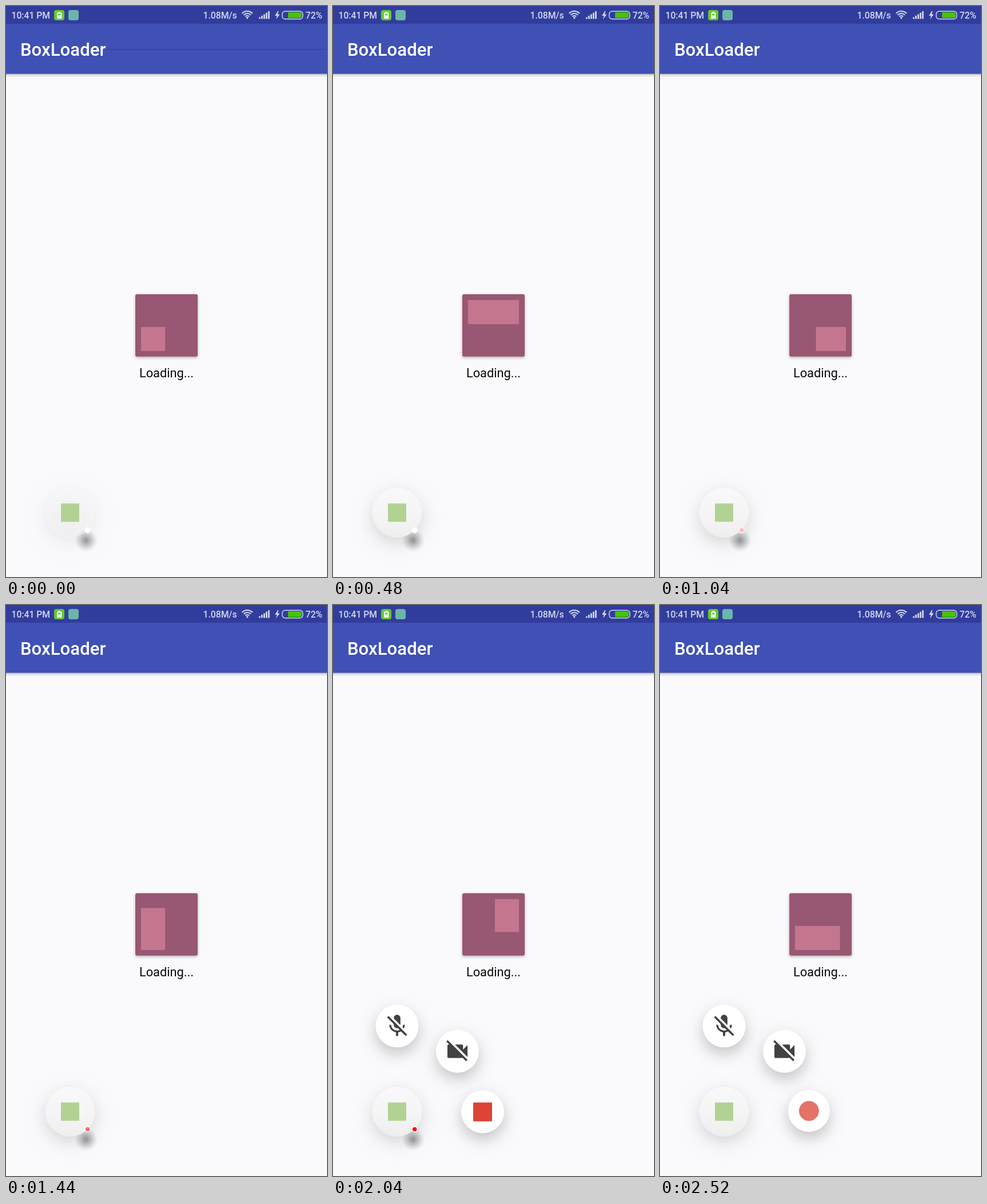
Write an HTML page with a canvas that moves like this. It is 561 px wide and 998 px high and loops after 2560 ms.

```html
<!DOCTYPE html>
<html lang="en">
<head>
<meta charset="utf-8">
<title>BoxLoader</title>
<style>
  html, body { margin: 0; width: 100%; height: 100%; overflow: hidden; background: #faf9fc; }
  canvas { display: block; }
</style>
</head>
<body>
<canvas id="stage" width="561" height="998"></canvas>
<script>
const ctx = document.getElementById('stage').getContext('2d');
const LOOP = 2560;
const BG = '#faf9fc';
const STATUS = '#d5d8ee';
const ICON = '#424242';

const MIC_OFF = new Path2D('M19 11h-1.7c0 .74-.16 1.43-.43 2.05l1.23 1.23c.56-.98.9-2.09.9-3.28z' +
  'm-4.02.17c0-.06.02-.11.02-.17V5c0-1.66-1.34-3-3-3S9 3.34 9 5v.18l5.98 5.99z' +
  'M4.27 3L3 4.27l6.01 6.01V11c0 1.66 1.33 3 2.99 3 .22 0 .44-.03.65-.08l1.66 1.66' +
  'c-.71.33-1.5.52-2.31.52-2.76 0-5.3-2.1-5.3-5.1H5c0 3.41 2.72 6.23 6 6.72V21h2v-3.28' +
  'c.91-.13 1.77-.45 2.54-.9L19.73 21 21 19.73z');
const CAM_OFF = new Path2D('M21 6.5l-4 4V7c0-.55-.45-1-1-1H9.82L21 17.18z' +
  'M3.27 2L2 3.27 4.73 6H4c-.55 0-1 .45-1 1v10c0 .55.45 1 1 1h12c.21 0 .39-.08.54-.18L19.73 21 21 19.73z');
const BOLT = new Path2D('M475 9L470 17H473.5L472 23L478.5 14.5H474.5L476.5 9z');

const clamp = v => Math.max(0, Math.min(1, v));
const ramp = (t, from, to) => clamp((t - from) / (to - from));
const easeOut = v => 1 - (1 - v) ** 3;
const mix = (a, b, v) => a + (b - a) * v;

function rect(x, y, w, h, color) {
  ctx.fillStyle = color;
  ctx.fillRect(x, y, w, h);
}

function roundRect(x, y, w, h, r, color) {
  ctx.beginPath();
  ctx.roundRect(x, y, w, h, r);
  ctx.fillStyle = color;
  ctx.fill();
}

function disc(x, y, r, color) {
  ctx.beginPath();
  ctx.arc(x, y, r, 0, Math.PI * 2);
  ctx.fillStyle = color;
  ctx.fill();
}

function label(text, x, y, font, color, align = 'left') {
  ctx.font = font + ' Roboto, sans-serif';
  ctx.textAlign = align;
  ctx.fillStyle = color;
  ctx.fillText(text, x, y);
}

function withShadow(color, blur, dy, draw) {
  ctx.save();
  ctx.shadowColor = color;
  ctx.shadowBlur = blur;
  ctx.shadowOffsetY = dy;
  draw();
  ctx.restore();
}

function withAlpha(alpha, draw) {
  ctx.save();
  ctx.globalAlpha *= alpha;
  draw();
  ctx.restore();
}

function drawStatusBar() {
  rect(0, 0, 561, 31, '#313d9d');
  const font = '500 15.7px';
  label('10:41 PM', 9.5, 21.5, font, STATUS);
  label('1.08M/s', 344.5, 21.5, font, STATUS);
  label('72%', 523.5, 21.5, font, STATUS);

  roundRect(84, 7, 18, 18, 4, '#61cb2c');
  rect(91.5, 10, 3.5, 2, '#fff');
  roundRect(89, 11.5, 8.5, 10.5, 1, '#fff');
  rect(91, 13.5, 4.5, 3, '#61cb2c');
  roundRect(109, 7, 18, 18, 4, '#6bb5a9');

  ctx.strokeStyle = STATUS;
  ctx.lineWidth = 2.2;
  for (const r of [4.5, 8.5, 12.5]) {
    ctx.beginPath();
    ctx.arc(421.7, 21.5, r, -Math.PI * 0.76, -Math.PI * 0.24);
    ctx.stroke();
  }
  disc(421.7, 20.8, 1.7, STATUS);

  for (let i = 0; i < 5; i++) {
    const h = 3 + i * 2.6;
    rect(442 + i * 4, 22.5 - h, 2.7, h, STATUS);
  }
  ctx.fillStyle = STATUS;
  ctx.fill(BOLT);

  ctx.lineWidth = 1.4;
  ctx.beginPath();
  ctx.roundRect(482.7, 9.2, 36, 13.6, 5);
  ctx.stroke();
  roundRect(493, 11, 24, 10, [1, 4, 4, 1], '#45c400');
}

function drawHeader(t) {
  const shade = ctx.createLinearGradient(0, 118, 0, 125);
  shade.addColorStop(0, 'rgba(0,0,0,.33)');
  shade.addColorStop(0.35, 'rgba(0,0,0,.12)');
  shade.addColorStop(1, 'rgba(0,0,0,0)');
  rect(0, 118, 561, 7, shade);
  rect(0, 31, 561, 87.5, '#3f51b5');
  // brief hairline while the screen settles
  withAlpha(1 - ramp(t, 40, 280), () => rect(174, 75, 387, 1.3, '#35469b'));
  label('BoxLoader', 24.9, 87, '500 31.17px', '#fff');
  drawStatusBar();
}

// The block stretches along one side, then its tail catches up, clockwise.
function drawLoader(t) {
  const TICKS = 10, SIDE = 42, TRAVEL = 47, X = 236, Y = 514;
  const tick = Math.floor(t * 0.0603);
  const phase = Math.floor(tick / TICKS) % 8;
  const moved = (tick % TICKS) / (TICKS - 1) * TRAVEL;
  const catching = phase % 2 === 1;
  const head = catching ? TRAVEL : moved;
  const tail = catching ? moved : 0;
  const length = SIDE + head - tail;
  const back = TRAVEL - head;

  withShadow('rgba(0,0,0,.28)', 5, 2, () => roundRect(226, 503.7, 109, 109, 3, '#985773'));
  const block = [
    [X, Y + back, SIDE, length],
    [X + tail, Y, length, SIDE],
    [X + TRAVEL, Y + tail, SIDE, length],
    [X + back, Y + TRAVEL, length, SIDE]
  ][phase >> 1];
  rect(...block, '#c5768f');
  label('Loading...', 280.5, 649, '400 21.8px', '#0a0a0a', 'center');
}

function button(x, y, r) {
  withShadow('rgba(0,0,0,.22)', 26, 11, () => disc(x, y, r, '#fff'));
}

function icon(path, x, y) {
  const scale = 1.95;
  ctx.save();
  ctx.translate(x - 12 * scale, y - 12 * scale);
  ctx.scale(scale, scale);
  ctx.fillStyle = ICON;
  ctx.fill(path);
  ctx.restore();
}

function drawMenu(t) {
  const open = easeOut(ramp(t, 1760, 1980));
  if (!open) return;
  const swapped = ramp(t, 2320, 2400);
  const place = (x, y, r, content) => {
    ctx.save();
    ctx.globalAlpha = open;
    ctx.translate(mix(112, x, open), mix(885.5, y, open));
    ctx.scale(mix(0.4, 1, open), mix(0.4, 1, open));
    button(0, 0, r);
    content();
    ctx.restore();
  };
  place(112, 735.8, 37.5, () => icon(MIC_OFF, 0, 0));
  place(217.5, 780, 37.5, () => icon(CAM_OFF, 0, 0));
  place(261.5 - swapped * 1.2, 885.7 - swapped * 1.4, 37.5 - swapped, () => {
    withAlpha(1 - swapped, () => roundRect(-16.5, -16.3, 33, 33, 1, '#db4437'));
    withAlpha(ramp(t, 2360, 2570) * 0.98, () => disc(0, 0, 17.4, '#db4437'));
  });
}

function drawFab(t) {
  const x = 112, y = 885.5;
  const recording = 1 - ramp(t, 2320, 2400);
  const settle = mix(0.45, 1, ramp(t, 0, 280));

  withAlpha(settle, () => {
    withShadow('rgba(0,0,0,.15)', 30, 10, () => disc(x, y, 43.3, '#f5f5f7'));
  });
  withAlpha(recording, () => {
    const smudge = ctx.createRadialGradient(140, 934, 2, 140, 934, 20);
    smudge.addColorStop(0, 'rgba(70,70,70,.5)');
    smudge.addColorStop(0.45, 'rgba(90,90,90,.28)');
    smudge.addColorStop(1, 'rgba(120,120,120,0)');
    rect(118, 912, 44, 44, smudge);
  });
  withAlpha(settle, () => {
    const face = ctx.createLinearGradient(0, y - 43, 0, y + 43);
    face.addColorStop(0, '#f9f9fb');
    face.addColorStop(0.6, '#f4f4f5');
    face.addColorStop(1, '#eeeeef');
    disc(x, y, 43.3, face);
  });
  rect(x - 16, y - 16, 32, 32, '#b2d294');

  withAlpha(recording, () => {
    disc(142.7, 916.2, 5.2, '#fff');
    withAlpha(ramp(t, 680, 1880), () => disc(142.7, 916.2, 3.8, '#f5140f'));
  });
}

function draw(now) {
  const t = now % LOOP;
  rect(0, 0, 561, 998, BG);
  drawHeader(t);
  drawLoader(t);
  drawMenu(t);
  drawFab(t);
}

const start = performance.now();
function tick() {
  draw(performance.now() - start);
  requestAnimationFrame(tick);
}
tick();
</script>
</body>
</html>
```
